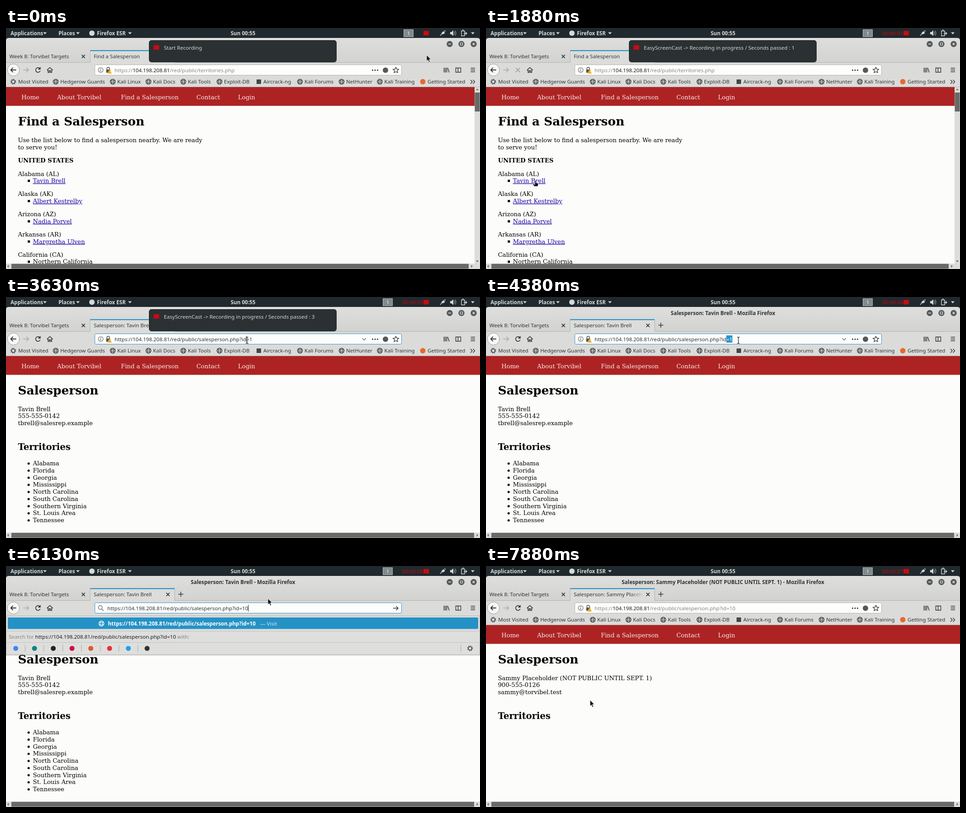
Animation, 1048 px wide and 534 px high, one loop 8000 ms. Source, as an HTML page:

```html
<!DOCTYPE html>
<html lang="en">
<head>
<meta charset="utf-8">
<title>Browser session</title>
<style>
  html, body { margin: 0; width: 100%; height: 100%; overflow: hidden; background: #fcfdfa; }
  svg { display: block; width: 100%; height: 100%; }
  text { white-space: pre; }
  .ui { font: 11.6px "Noto Sans", sans-serif; }
  .bold { font: 600 11.65px "Noto Sans", sans-serif; }
  .page { font: 13.17px "DejaVu Serif", serif; }
  .strong { font-weight: bold; }
  .h1 { font-size: 26.3px; font-weight: bold; }
  .h2 { font-size: 19.6px; font-weight: bold; }
</style>
</head>
<body>
<svg id="stage" viewBox="0 0 1048 534" preserveAspectRatio="none"></svg>
<script>
const LOOP = 8000, STEP = 125;
const INK = '#2e3436', PALE = '#d5d8d7', RED = '#c90a12';
const BASE = 'https://104.198.208.81/red/public/';
const PERSON = 'Tavin Brell', HIDDEN = 'Sammy Placeholder (NOT PUBLIC UNTIL SEPT. 1)';
const stage = document.getElementById('stage');
const pen = document.createElement('canvas').getContext('2d');

// Drawing helpers
const text = (x, y, s, cls = 'ui', fill = INK, extra = '') =>
  `<text x="${x}" y="${y}" class="${cls}" fill="${fill}" ${extra}>${s}</text>`;
const rect = (x, y, w, h, fill, r = 0, extra = '') =>
  `<rect x="${x}" y="${y}" width="${w}" height="${h}" rx="${r}" fill="${fill}" ${extra}/>`;
const disc = (x, y, r, fill, extra = '') =>
  `<circle cx="${x}" cy="${y}" r="${r}" fill="${fill}" ${extra}/>`;
const line = (d, color = INK, width = 1.5) =>
  `<path d="${d}" fill="none" stroke="${color}" stroke-width="${width}"/>`;
const shape = (d, fill = INK) => `<path d="${d}" fill="${fill}"/>`;
const cross = (x, y, r, color = INK) =>
  line(`M${x - r} ${y - r}l${2 * r} ${2 * r}m0 ${-2 * r}l${-2 * r} ${2 * r}`, color);
const down = (x, y) => shape(`M${x} ${y}h8l-4 4.5z`, PALE);
const globe = (x, y, color = INK) =>
  disc(x, y, 5.6, 'none', `stroke="${color}" stroke-width="1.2"`) +
  `<ellipse cx="${x}" cy="${y}" rx="2.6" ry="5.6" fill="none" stroke="${color}"/>` +
  line(`M${x - 5} ${y - 2}h10m0 4h-10`, color, 1);
const gear = (x, y) => disc(x, y, 3.6, 'none', `stroke="${INK}" stroke-width="1.4"`) +
  disc(x, y, 5.2, 'none', `stroke="${INK}" stroke-width="2" stroke-dasharray="1.8 2.28"`);
const width = s => {
  pen.font = '11.6px "Noto Sans", sans-serif';
  return pen.measureText(s).width;
};

// Pointer waypoints: time, x, y
const PATH = [
  [0, 930, 60], [250, 930, 60], [500, 700, 130], [875, 200, 300], [1125, 109, 338],
  [1875, 109, 338], [2625, 350, 236], [2750, 480, 160], [2875, 558, 118], [3000, 558, 118],
  [3375, 533, 96], [3625, 533, 96], [4125, 558, 96], [5125, 558, 96], [5250, 562, 95],
  [5500, 579, 72], [7125, 579, 72], [7250, 490, 140], [7375, 397, 201], [7500, 397, 201],
  [7625, 290, 270], [7750, 198, 336], [7875, 230, 297], [LOOP, 230, 297]
];
function pointerAt(t) {
  const i = PATH.findIndex(p => p[0] > t);
  const [t0, x0, y0] = PATH[i - 1], [t1, x1, y1] = PATH[i];
  const k = (t - t0) / (t1 - t0);
  return [x0 + (x1 - x0) * k, y0 + (y1 - y0) * k];
}

const secondsAt = t => t < 1125 ? 0 : t < 7125 ? Math.floor((t - 125) / 1000) : t < 7250 ? 6 : 7;

function topBar(t) {
  const recording = t >= 1125, box = recording ? 833.5 : 879.5;
  return rect(0, 0, 1048, 30, '#20292e') +
    text(10, 15.5, 'Applications', 'bold', PALE) + down(82, 9.5) +
    text(116, 15.5, 'Places', 'bold', PALE) + down(155, 9.5) +
    disc(190, 11.5, 6, PALE) + text(201, 15.5, 'Firefox ESR', 'bold', PALE) + down(270, 9.5) +
    text(524, 15.5, 'Sun 00:55', 'bold', PALE, 'text-anchor="middle"') +
    rect(box, 3.5, 21, 16, '#82898c', 0, 'stroke="#b5babb"') +
    text(box + 10.5, 15.5, '1', 'ui', '#f2f2f2', 'text-anchor="middle"') +
    (recording ? text(876, 15.5, '00:00:0' + secondsAt(t), 'ui', RED) : '') +
    rect(923, 6.5, 12, 10, RED) +
    line('M960 17l4-4', PALE, 1.5) + shape('M962 12l5-5 4 4-5 3zM968 7l3-2 1 3z', PALE) +
    shape('M982 9h3l4-4v13l-4-4h-3z', PALE) +
    line('M991 8q2 3.5 0 7m2-9q4 5.500 0 11', '#8d9496', 1.3) +
    line('M1007 6.500h7v11h-7zm2-2h3M1012 12h7m-3-3l3 3-3 3', PALE, 1.4) + down(1028, 9.5);
}

function tabs(t, title) {
  const long = title.length > 26, since = t - (t < 4000 ? 2125 : 6625);
  const burst = since === 0 ? [13, .5] : since === STEP ? [70, .2] : null;
  return shape('M0 78V28q0-6 6-6h1036q6 0 6 6v50z', 'url(#frame)') +
    text(524, 39.5, title + ' - Mozilla Firefox', 'bold', INK, 'text-anchor="middle"') +
    [981, 1007, 1034].map(x => disc(x, 35.5, 6.7, '#535a5c')).join('') +
    line('M978 35.500h6', '#eee') + line('M1004.500 33h5v5h-5z', '#eee', 1.2) + cross(1034, 35.5, 2.2, '#eee') +
    line('M0 76.500h186M373 76.500h675', '#b2b2b0', 1) +
    text(7.5, 67, 'Week 8: Torvibel Targets') + cross(171, 63, 3.6) +
    rect(186, 49, 187, 28, '#dcdcda') + rect(186, 49, 187, 2.2, '#2a93cc') +
    line('M186 50v27M373 50v27', '#b2b2b0', 1) +
    `<g clip-path="url(#tab)">${burst ? disc(201, 63, burst[0], '#1a86e0', `opacity="${burst[1]}"`) : ''}
     <g clip-path="url(#label)">${text(194, 67, title, 'ui', long ? 'url(#fade)' : INK)}</g></g>` +
    cross(358, 63, 3.6) + line('M381 62.500h11m-5.500-5.500v11');
}

function addressBar(t, file) {
  const focused = t >= 3375 && t < 6375, edited = t >= 5875 && t < 6375;
  const x = edited ? 224 : 240, url = BASE + file;
  const end = x + width(url), beforeId = x + width(url.slice(0, -2));
  let out = rect(196.5, 81.5, 678, 23, '#fdfdfb', 3, `stroke="${focused ? '#3993cc' : '#b4b4b2'}"`);
  if (edited) {
    out += disc(208.5, 92, 4.2, 'none', 'stroke="#777" stroke-width="1.5"') + line('M211.500 95l4.500 4.500', '#777') +
      line('M856 93.500h11m-4.500-4.500l4.500 4.500-4.500 4.500');
  } else {
    out += disc(209.5, 93, 5.3, 'none', 'stroke="#666" stroke-width="1.1"') + line('M209.500 92v4m0-6.500v1.400', '#555', 1.3) +
      line('M223 92v-2a3 3 0 0 1 6 0v2', '#555') + rect(221.5, 92, 9, 7, '#555', 1) +
      shape('M229 92l5 9h-10z', '#f2b21b') +
      [810.5, 816, 821.500].map(cx => disc(cx, 93.5, 1.6, INK)).join('') + disc(839, 93.5, 6, '#53585a') +
      line('M862 87l1.900 4.100 4.400.5-3.300 3 .9 4.400-3.900-2.200-3.900 2.200.9-4.400-3.300-3 4.400-.5z', INK, 1.3);
    if (focused && t < 5500) out += line('M788 91.500l4 4 4-4', '#666', 1.4);
  }
  if (focused) {
    const selected = t >= 4000 && t < 4500 ? 2 : t >= 3750 && t < 4625 ? 1 : 0;
    const from = t < 4250 ? beforeId : end - width(url.slice(-selected));
    const to = selected === 1 && t < 4000 ? x + width(url.slice(0, -1)) : end;
    out += text(x, 97.5, url);
    if (selected) {
      out += `<clipPath id="sel">${rect(from, 85, to - from, 16, '#000')}</clipPath>` +
        rect(from, 85, to - from, 16, '#2a93cc') + `<g clip-path="url(#sel)">${text(x, 97.5, url, 'ui', '#fff')}</g>`;
    } else if (t < 5500 || edited) {
      out += rect(t < 3750 ? beforeId : end, 86, 1, 15, '#111');
    }
  } else {
    const grey = s => `<tspan fill="#858785">${s}</tspan>`;
    out += text(x, 97.5, grey('https://') + '104.198.208.81' + grey('/red/public/' + file), 'ui', '#1b1f20');
  }
  return out;
}

const BOOKMARKS = [[120, 'Hedgerow Guards'], [246, 'Kali Linux'], [325, 'Kali Docs'], [402, 'Kali Tools'],
  [482, 'Exploit-DB'], [569, 'Aircrack-ng'], [660, 'Kali Forums'], [752, 'NetHunter'],
  [836.5, 'Kali Training'], [932, 'Getting Started']];

function toolbars(t, file) {
  const loading = t >= 1625 && t < 2750 || t >= 6375 && t < 7250;
  const hover = t >= 2875 && t < 3125;
  const icon = (x, name) => name === 'Aircrack-ng' ? rect(x - 15, 114, 10, 10, '#43484a')
    : name === 'Getting Started' ? disc(x - 10.5, 119, 6, '#e66a2c') : globe(x - 10, 119);
  return rect(0, 77, 1048, 54, '#dbdbd9') + line('M0 130.500h1048', '#b0b0ae', 1) +
    disc(16.5, 93, 13.3, '#f7f7f5', 'stroke="#989896"') + line('M22.500 93h-12m5-5l-5 5 5 5', INK, 1.8) +
    line('M38 93h12m-5-5l5 5-5 5', '#aaaaa8', 1.6) +
    (loading ? cross(70.5, 93, 4.6, '#9c9c9a')
      : line('M75 90a5.200 5.200 0 1 0 .6 5', INK, 1.7) + shape('M76.500 86v6h-6z')) +
    line('M90.500 93.500l6.500-6 6.500 6M93 92.500v6h2.700v-4h2.600v4h2.700v-6', INK, 1.6) +
    addressBar(t, file) +
    line('M968.500 88v10.500m3-10.500v10.500m3-10.500v10.500m2-10l3.500 10', INK, 1.5) +
    line('M994.500 88.500h11v9.500h-11zm5 0v9.500', INK, 1.4) + line('M1027.500 89h9.500m-9.500 4h9.500m-9.500 4h9.500', INK, 1.5) +
    (hover ? rect(551, 109.5, 85, 19.5, '#c3c3c1', 3) : '') +
    gear(16, 119) + text(27, 123.3, 'Most Visited') +
    BOOKMARKS.map(([x, name]) => icon(x, name) + text(x, 123.3, name)).join('') +
    line('M1027 115l4 4.300-4 4.300m5.500-8.600l4 4.300-4 4.300', INK, 1.4);
}

const arrowMark = (x, y, dx, dy) =>
  line(`M${x - dx - 2 * dy} ${y - dy - 2 * dx}L${x + dx} ${y + dy}L${x - dx + 2 * dy} ${y - dy + 2 * dx}`, INK, 1.2);

function pageFrame(right, heading) {
  const nav = [[34, 'Home'], [113, 'About Torvibel'], [254, 'Find a Salesperson'], [421, 'Contact'], [513, 'Login']];
  return rect(0, 131, right, 41.5, '#ad2323') +
    nav.map(([x, s]) => text(x, 157.7, s, 'page', '#f6eeec')).join('') +
    text(26.5, 215.5, heading, 'page h1', '#000');
}

function bottomBar(right) {
  return rect(0, 522, 1048, 12, '#dcdcda') + rect(12, 522.5, right - 25, 11, '#696967') +
    arrowMark(5, 528, -1, 0) + arrowMark(right - 6.5, 528, 1, 0);
}

function listPage() {
  const areas = [['Alabama (AL)', PERSON], ['Alaska (AK)', 'Albert Kestrelby'], ['Arizona (AZ)', 'Nadia Porvel'],
    ['Arkansas (AR)', 'Margretha Ulven'], ['California (CA)', 'Northern California']];
  const black = (x, y, s, cls = '') => text(x, y, s, 'page ' + cls, '#000');
  return pageFrame(1036, 'Find a Salesperson') +
    black(26.5, 252.5, 'Use the list below to find a salesperson nearby. We are ready') +
    black(26.5, 268.5, 'to serve you!') + black(26.5, 298, 'UNITED STATES', 'strong') +
    areas.map(([area, name], i) => {
      const y = 327.5 + 44.8 * i;
      return black(26.5, y, area) + rect(48, y + 8.7, 5, 5, '#000') +
        (i < 4 ? text(59.5, y + 15.7, name, 'page', '#1c00a6', 'text-decoration="underline"') : black(59.5, y + 15.7, name));
    }).join('') +
    rect(1036, 131, 12, 391, '#dcdcda') + rect(1036.5, 143, 11, 42, '#696967') +
    arrowMark(1042, 136.5, 0, -1) + arrowMark(1042, 516.5, 0, 1) + bottomBar(1036);
}

function personPage(lines, territories) {
  return pageFrame(1048, 'Salesperson') +
    lines.map((s, i) => text(26.5, 252.5 + 15.8 * i, s, 'page', '#000')).join('') +
    text(26.5, 338.5, 'Territories', 'page h2', '#000') +
    territories.map((s, i) => disc(50, 369 + 15.75 * i, 2.5, '#000') +
      text(59.5, 373.2 + 15.75 * i, s, 'page', '#000')).join('') + bottomBar(1048);
}

function suggestions(url) {
  const engines = ['#4285f4', '#0c8484', '#222', '#d70751', '#de5833', '#e53238', '#1da1f2', '#333'];
  return rect(0, 196, 1048, 3, '#000', 0, 'opacity=".1"') +
    rect(.5, 110.5, 1047, 86, '#dededc', 0, 'stroke="#b4b4b2"') + rect(4, 114, 1040, 25.5, '#2592c6', 2) +
    globe(211, 127.5, '#fff') +
    text(225.5, 131.7, `<tspan font-weight="bold">${url}</tspan>`, 'ui', '#fff') +
    text(562, 131.7, '— Visit', 'ui', '#cfe6f3') +
    line('M0 144.500h1048M0 169.500h1048', '#c2c2c0', 1) +
    text(6, 160.5, `Search for <tspan fill="#1b1f20">${url}</tspan> with:`, 'ui', '#858785') +
    engines.map((c, i) => disc(21.5 + 41.5 * i, 182.5, 5.5, c)).join('') +
    [42.5, 83.5, 125.5, 166.5, 208.5, 249.5, 291.5, 1005.5].map(x => line(`M${x} 175v15`, '#a8a8a6', 1)).join('') +
    gear(1026, 182.5);
}

function notification(t) {
  const opacity = Math.max(0, Math.min(1, (4000 - t) / 250));
  const message = t < 1125 ? 'Start Recording'
    : 'EasyScreenCast -&gt; Recording in progress / Seconds passed : ' + secondsAt(t);
  return opacity && `<g opacity="${opacity}">${rect(316.5, 27.5, 414, 48, '#2b3133', 5, 'stroke="#1d2325"')}${
    rect(326.5, 38, 12, 10, RED)}${text(349, 48, message, 'ui', PALE)}</g>`;
}

function pointer(t) {
  const [x, y] = pointerAt(t);
  let art;
  if (t >= 1125 && t < 2000) {
    art = '<path d="M-1 0h2.500v5l5 1v4l-1.500 3h-7l-4-5 1-1 4 2z" fill="#111" stroke="#fff" stroke-width=".8"/>';
  } else if (t >= 3250 && t < 5500) {
    art = line('M-3-7h6M-3 7h6M0-7v14', '#fff', 2.4) + line('M-3-7h2.500l.5 1 .5-1h2.500M-3 7h6M0-7v14', '#111', 1.2);
  } else {
    art = '<path d="M0 0v13.500l3-2.800 2.200 5 2.300-1-2.200-4.900h4.200z" fill="#111" stroke="#fff" stroke-width=".8"/>';
  }
  return `<g transform="translate(${x} ${y})">${art}</g>`;
}

const DEFS = `<defs>
  <linearGradient id="frame" x2="0" y2="1"><stop stop-color="#dededc"/><stop offset="1" stop-color="#d2d2d0"/></linearGradient>
  <linearGradient id="fade" gradientUnits="userSpaceOnUse" x1="318" x2="349" y1="0" y2="0">
    <stop stop-color="${INK}"/><stop offset="1" stop-color="${INK}" stop-opacity="0"/></linearGradient>
  <clipPath id="tab">${rect(186, 49, 187, 28, '#000')}</clipPath>
  <clipPath id="label">${rect(190, 49, 159, 28, '#000')}</clipPath></defs>`;

const TERRITORIES = ['Alabama', 'Florida', 'Georgia', 'Mississippi', 'North Carolina', 'South Carolina',
  'Southern Virginia', 'St. Louis Area', 'Tennessee'];

function scene(t) {
  const view = t < 2000 ? 0 : t < 6500 ? 1 : 2;
  const title = ['Find a Salesperson', 'Salesperson: ' + PERSON, 'Salesperson: ' + HIDDEN][view];
  const file = view === 0 ? 'territories.php' : 'salesperson.php?id=' + (t < 5875 ? 1 : 10);
  const page = [
    () => listPage(),
    () => personPage([PERSON, '555-555-0142', 'tbrell@salesrep.example'], TERRITORIES),
    () => personPage([HIDDEN, '900-555-0126', 'sammy@torvibel.test'], [])
  ][view]();
  const status = t >= 1125 && t < 1875 ? rect(-1, 515, 314, 20, '#d6d6d4', 2, 'stroke="#b4b4b2"') +
    text(3, 528.7, BASE + 'salesperson.php?id=1') : '';
  return DEFS + rect(0, 0, 1048, 534, '#fcfdfa') + page + topBar(t) + tabs(t, title) + toolbars(t, file) +
    (t >= 6125 && t < 6375 ? suggestions(BASE + file) : '') + status + (notification(t) || '') + pointer(t);
}

const start = performance.now();
let shown = -1;
function tick() {
  const t = Math.floor((performance.now() - start) % LOOP / STEP) * STEP;
  if (t !== shown) stage.innerHTML = scene(shown = t);
  requestAnimationFrame(tick);
}
tick();
</script>
</body>
</html>
```
